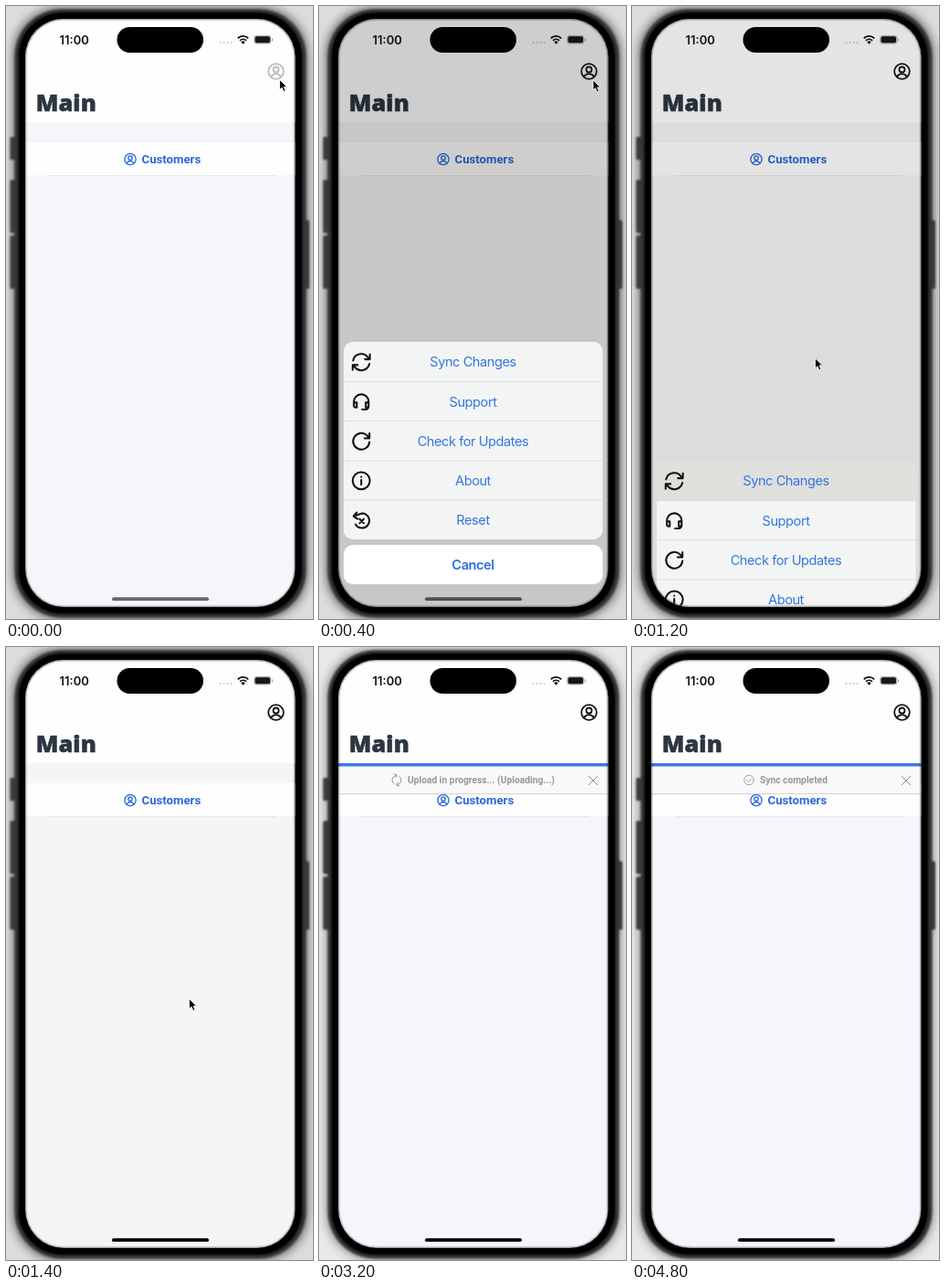
Animation of 336 by 670 pixels, one loop 5400 ms. Source, as an HTML page:

```html
<!DOCTYPE html>
<html lang="en">
<head>
<meta charset="utf-8">
<title>Sync</title>
<style>
html, body { margin: 0; width: 100%; height: 100%; overflow: hidden; }
svg { display: block; width: 336px; height: 670px; }
text { font-family: Roboto, "Liberation Sans", sans-serif; }
symbol { overflow: visible; }
.icon { fill: none; stroke: currentColor; stroke-width: 2.3; stroke-linecap: round; stroke-linejoin: round; }
.row { font-family: Inter, Roboto, sans-serif; font-size: 14.6px; letter-spacing: -.45px; fill: #3476e2; text-anchor: middle; }
.note { font-size: 10.25px; font-weight: 700; fill: #97979a; }
</style>
</head>
<body>
<svg viewBox="0 0 336 670">
  <defs>
    <clipPath id="screen"><rect x="21" y="14" width="295.500" height="643" rx="42"/></clipPath>
    <clipPath id="below"><rect x="21" y="127" width="296" height="60"/></clipPath>
    <filter id="blur" x="-20%" y="-20%" width="140%" height="140%"><feGaussianBlur stdDeviation="6"/></filter>
    <filter id="soft"><feGaussianBlur stdDeviation=".8"/></filter>
    <symbol id="person" viewBox="0 0 24 24"><circle cx="12" cy="12" r="10.500"/><circle cx="12" cy="9.500" r="3.800"/><path d="M5 19.500a8 8 0 0 1 14 0"/></symbol>
    <symbol id="sync" viewBox="0 0 24 24"><path d="M2 10a10.200 10.200 0 0 1 18-4l2.500 2.500M22.500 2.500v6h-6M22 14a10.200 10.200 0 0 1-18 4L1.500 15.500M1.500 21.500v-6h6"/></symbol>
    <symbol id="support" viewBox="0 0 24 24"><path d="M3 16v-4a9 9 0 0 1 18 0v6a3.500 3.500 0 0 1-3.500 3.500H13M3 13h3.500v6H5a2 2 0 0 1-2-2zM21 13h-3.500v6H19a2 2 0 0 0 2-2z"/></symbol>
    <symbol id="refresh" viewBox="0 0 24 24"><path d="M22 13a10 10 0 1 1-3-8l3 3.500M22 2.500v6h-6"/></symbol>
    <symbol id="info" viewBox="0 0 24 24"><circle cx="12" cy="12" r="10.500"/><path d="M12 11v6M12 7.200v.1"/></symbol>
    <symbol id="reset" viewBox="0 0 24 24"><path d="M5 17a9 9 0 1 0 8-13.500L3 7M6.500 2.500L2.500 7l5 3.500M10 10.500l5 5M15 10.500l-5 5"/></symbol>
    <symbol id="done" viewBox="0 0 24 24"><circle cx="12" cy="12" r="10.500"/><path d="M7 12.500l3.500 3.500 6.500-7"/></symbol>
  </defs>

  <rect id="back" width="336" height="670"/>
  <rect id="shadow" x="9" y="3" width="320" height="666" rx="50" filter="url(#blur)"/>

  <!-- phone body -->
  <g filter="url(#soft)">
    <g fill="#3a3b3b">
      <rect x="4.500" y="143" width="7" height="25" rx="1.500"/>
      <rect x="4.500" y="190" width="7" height="58" rx="1.500"/>
      <rect x="4.500" y="251" width="7" height="58" rx="1.500"/>
      <rect x="326" y="234" width="6" height="75" rx="1.500"/>
    </g>
    <rect x="9.500" y="3.500" width="319" height="665" rx="52" fill="#343535"/>
    <rect x="13" y="6.500" width="311.500" height="658.500" rx="49"/>
  </g>

  <g clip-path="url(#screen)">
    <rect id="page" x="21" y="14" width="296" height="643"/>
    <path d="M21 14h296v113H21zM21 149h296v36H21z" fill="#fefefe"/>
    <path d="M47 185.500h249" stroke="#e6e6e6"/>
    <text x="32.800" y="115" style="font:800 25.500px 'Open Sans','Noto Sans',sans-serif" fill="#2b3641" stroke="#2b3641" stroke-width=".5">Main</text>
    <g color="#2d69d6">
      <use href="#person" class="icon" x="129" y="160.500" width="14" height="14"/>
      <text x="148.500" y="172" font-size="13.200" font-weight="700" fill="currentColor">Customers</text>
    </g>

    <g clip-path="url(#below)">
      <g id="banner">
        <rect x="21" y="130" width="296" height="31" fill="#f9f9fc"/>
        <path d="M21 160.500h296" stroke="#d3d3d5"/>
        <path d="M295 141l10 10m0-10l-10 10" stroke="#909092" fill="none"/>
        <use id="mark" class="icon" color="#97979a" style="stroke-width:1.800" width="12" height="12" x="-6" y="-6"/>
        <text id="note" class="note" y="149"></text>
      </g>
      <rect id="bar" x="21" y="127" width="296" height="3.500" fill="#3b79e2"/>
    </g>

    <text x="58.500" y="41.500" style="font:600 13px Inter,sans-serif" fill="#111">11:00</text>
    <g fill="#c4c4c4"><circle cx="234.500" cy="40" r="1"/><circle cx="238.500" cy="40" r="1"/><circle cx="242.500" cy="40" r="1"/><circle cx="246.500" cy="40" r="1"/></g>
    <path d="M253.800 35.300a8 8 0 0 1 11.400 0M256 37.800a5 5 0 0 1 7 0" fill="none" stroke="#111" stroke-width="1.800"/>
    <path d="M257.300 39.500a3 3 0 0 1 4.400 0l-2.200 2.200z" fill="#111"/>
    <rect x="271.300" y="32" width="19" height="9.500" rx="3" fill="#b5b5b5"/>
    <rect x="272.600" y="33.300" width="16.400" height="7" rx="2" fill="#17171a"/>
    <path d="M291.500 35.500v3" stroke="#a0a0a0"/>

    <rect id="dim" x="21" y="14" width="296" height="643"/>
    <use id="user" href="#person" class="icon" x="286" y="62" width="19" height="19"/>
    <rect id="home" x="116" y="646.300" width="106" height="3.800" rx="1.900"/>

    <g id="sheet">
      <rect x="27" y="367" width="283.500" height="216" rx="10" fill="#f3f5f5"/>
      <path id="hover" d="M27 410.200V377a10 10 0 0 1 10-10h263.500a10 10 0 0 1 10 10v33.200z" fill="#dfdfdc"/>
      <g id="rows" color="#111"></g>
      <rect x="27" y="589" width="283.500" height="43" rx="10" fill="#fff"/>
      <text class="row" x="168.500" y="616" font-weight="600" style="fill:#2c6ee0">Cancel</text>
    </g>
  </g>
  <rect x="20.500" y="13.500" width="296.500" height="644" rx="42.500" fill="none" stroke="#000" stroke-width="1.500" filter="url(#soft)"/>
  <rect x="121.500" y="23" width="94.500" height="28" rx="14"/>
  <path id="cursor" d="M0 0v11l2.500-2.300 1.900 4.300 2-.9-1.900-4.200H8z" stroke="#fff" stroke-width=".8"/>
</svg>
<script>
const $ = id => document.getElementById(id);
const set = (id, attrs) => { for (const k in attrs) $(id).setAttribute(k, attrs[k]); };
const STEP = 200, LOOP = 5400;

$("rows").innerHTML = [
  ["sync", "Sync Changes"], ["support", "Support"], ["refresh", "Check for Updates"],
  ["info", "About"], ["reset", "Reset"]
].map(([icon, label], i) => {
  const y = 389 + i * 43.2;
  const line = i ? `<path d="M27 ${y - 21.6}h283.500" stroke="#dcdede"/>` : "";
  return `${line}<use href="#${icon}" class="icon" x="35.500" y="${y - 10.5}" width="21.500" height="21.500"/>
    <text class="row" x="168.500" y="${y + 5.3}">${label}</text>`;
}).join("");

// Per-step poses of the pieces that move briefly
const cursorAt = [[299.5, 80.5], [300, 81], [300, 81], [202, 410], [192, 416], [201, 385], [200.5, 385], [200.5, 384.5]];
const sheetDrop = { 1: 90, 2: 0, 3: -1.5, 4: -1.5, 5: -1.5, 6: 130 };
const dimming = { 1: .12, 6: .1 };
const bannerLift = { 8: -34, 9: -15 };

function status(k) {
  if (k >= 24) return ["done", 128, 140, "Sync completed"];
  if (k >= 17) return ["sync", 60, 74, "Download in progress... (Waiting for data fr..."];
  return ["sync", 85, 97, "Upload in progress... (Uploading...)"];
}

function draw(t) {
  const k = Math.floor(t / STEP);
  const open = k in sheetDrop;
  const late = k >= 11;
  set("back", { fill: late ? "#eae9e7" : "#dddcdb" });
  set("shadow", { opacity: late ? .45 : .65 });
  set("page", { fill: k > 0 && k < 9 ? "#f5f5f4" : "#f5f5fc" });
  set("user", { color: k ? "#141414" : "#bdbdbd" });
  set("home", { fill: k < 1 ? "#666" : k < 7 ? "#505050" : "#000" });
  set("dim", { opacity: open ? dimming[k] ?? .19 : 0 });
  set("sheet", { visibility: open ? "visible" : "hidden", transform: `translate(0 ${sheetDrop[k] || 0})` });
  set("hover", { opacity: k === 5 || k === 6 ? 1 : 0 });

  const cursor = cursorAt[k];
  set("cursor", { visibility: cursor ? "visible" : "hidden", transform: `translate(${cursor || "0 0"})` });

  const shown = k >= 8 ? "visible" : "hidden";
  set("bar", { visibility: shown });
  set("banner", { visibility: shown, transform: `translate(0 ${bannerLift[k] || 0})` });
  const [icon, markX, textX, label] = status(k);
  const turn = icon === "sync" ? Math.max(0, k - 12) * 72 : 0;
  set("mark", { href: "#" + icon, transform: `translate(${markX} 145.500) rotate(${turn})` });
  set("note", { x: textX });
  $("note").textContent = label;
}

const start = performance.now();
function tick() {
  draw((performance.now() - start) % LOOP);
  requestAnimationFrame(tick);
}
tick();
</script>
</body>
</html>
```
